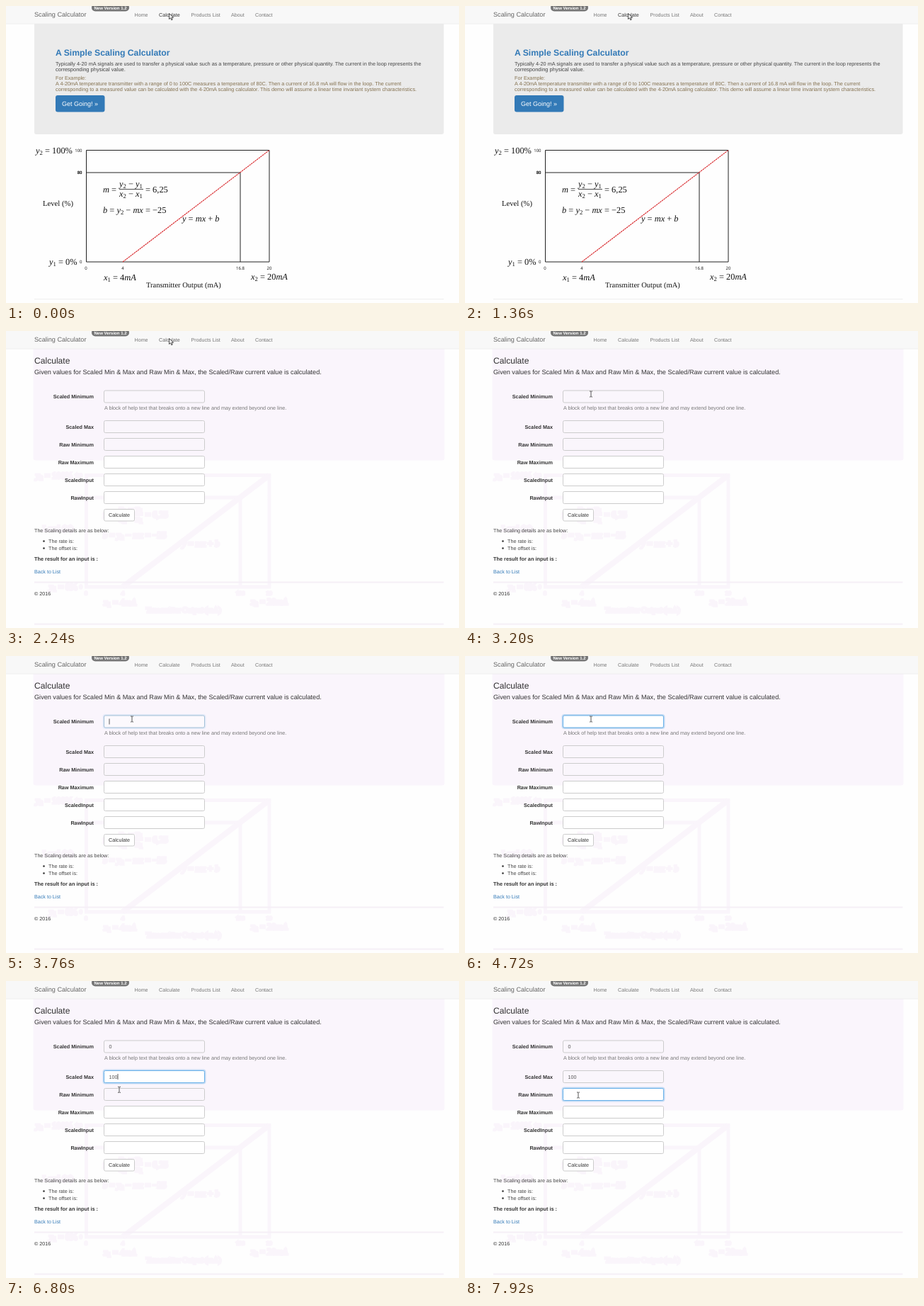
These frames come from a looping animation (640x419 px, 8 s). An HTML page:

```html
<!DOCTYPE html>
<html lang="en">
<head>
<meta charset="utf-8">
<title>Scaling Calculator</title>
<style>
html, body { margin: 0; width: 100%; height: 100%; overflow: hidden; background: #fefefe; }
svg { display: block; width: 640px; height: 419px; }
text { font-family: "Liberation Sans", Arial, sans-serif; white-space: pre; text-rendering: geometricPrecision; }
.serif { font-family: "Liberation Serif", Times, serif; fill: #111; }
.tick { font-family: "Open Sans", sans-serif; fill: #111; }
.ghost * { stroke: #faf5fb !important; fill: #faf5fb; }
.ghost text { stroke-width: 3.5; }
.ghost path { stroke-width: 5; stroke-dasharray: none; fill: none; }
.ghost .slope { stroke-width: 8; }
</style>
</head>
<body>
<svg id="stage" viewBox="0 0 640 419"></svg>
<script>
const text = (x, y, size, str, fill = '#444', extra = '') =>
  `<text x="${x}" y="${y}" font-size="${size}" fill="${fill}" ${extra}>${str}</text>`;
const box = (x, y, w, h, r, fill, extra = '') =>
  `<rect x="${x}" y="${y}" width="${w}" height="${h}" rx="${r}" fill="${fill}" ${extra}/>`;
const line = (d, stroke, extra = '') => `<path d="${d}" fill="none" stroke="${stroke}" ${extra}/>`;
const serif = (x, y, size, str) => text(x, y, size, str, '#111', 'class="serif"');
const tick = (x, y, str, extra = '') =>
  text(x, y, 6, str, '#111', `class="tick" text-anchor="${y > 370 ? 'middle' : 'end'}" ${extra}`);
const bold = 'font-weight="bold"';

// Letters are italic; "_1" becomes a subscript.
function math(x, y, str) {
  let drop = 0;
  const parts = str.match(/_\d|[a-zA-Z]+|[^a-zA-Z_]+/g).map(part => {
    const sub = part[0] === '_', dy = (sub ? 2.2 : 0) - drop;
    drop += dy;
    const style = sub ? 'font-size="8.7"' : /[a-z]/i.test(part) ? 'font-style="italic"' : '';
    return `<tspan dy="${dy}" ${style}>${part.replace('_', '')}</tspan>`;
  });
  return serif(x, y, 12.4, parts.join(''));
}

const chart =
  line('M113.5 361V203.5H372V361ZM113.5 235H331V361', '#222') +
  line('M165 361L372 203.5', '#d8282c', 'class="slope" stroke-width="1.1" stroke-dasharray="2.6 .7"') +
  tick(107.5, 206, '100') + tick(107.5, 237.3, '80', bold) + tick(107.5, 363.3, '0') +
  tick(113, 371.6, '0') + tick(165, 371.6, '4') + tick(331, 371.6, '16.8') + tick(372, 371.6, '20') +
  math(42, 207.5, 'y_2 = 100%') + math(61, 364.5, 'y_1 = 0%') +
  math(138, 386.5, 'x_1 = 4mA') + math(346, 385.5, 'x_2 = 20mA') +
  math(137, 262.5, 'm =') + math(160, 254.5, 'y_2 − y_1') + math(160, 268.8, 'x_2 − x_1') +
  line('M160 258.5H194', '#222', 'stroke-width=".8"') + math(197, 262.5, '= 6,25') +
  math(137, 291.5, 'b = y_2 − mx = −25') + math(249, 304, 'y = mx + b') +
  serif(52, 281.5, 10.7, 'Level (%)') + serif(198, 397, 10.5, 'Transmitter Output (mA)');

const brown = '#84714f', blue = '#337ab7';
const home =
  box(40, 20, 578.5, 161, 3, '#ebebeb') +
  text(70, 70.3, 12.2, 'A Simple Scaling Calculator', blue, bold) +
  text(70, 84, 7.3, 'Typically 4-20 mA signals are used to transfer a physical value such as a temperature, pressure or other physical quantity. The current in the loop represents the') +
  text(70, 91.6, 7.5, 'corresponding physical value.') +
  text(70, 104, 7.25, 'For Example:', brown) +
  text(70, 112, 7.28, 'A 4-20mA temperature transmitter with a range of 0 to 100C measures a temperature of 80C. Then a current of 16.8 mA will flow in the loop. The current', brown) +
  text(70, 119.7, 7.3, 'corresponding to a measured value can be calculated with the 4-20mA scaling calculator. This demo will assume a linear time invariant system characteristics.', brown) +
  box(70, 126, 69.5, 23.5, 3, blue) + text(79, 140.9, 9, 'Get Going! »', '#fff') +
  chart + line('M40 413.5H618.5', '#eee');

const fields = [['Scaled Minimum', 92.5], ['Scaled Max', 135], ['Raw Minimum', 160],
  ['Raw Maximum', 185], ['ScaledInput', 210], ['RawInput', 235]];
const form =
  box(38.5, 20, 581, 162.5, 3, '#faf5fc') + `<g class="ghost">${chart}</g>` +
  line('M40 413.5H618.5M40 354.5H618.5', '#f6f0f7', 'stroke-width="2"') +
  text(40, 46, 12.1, 'Calculate', '#333') +
  text(40, 61, 9.13, 'Given values for Scaled Min &amp; Max and Raw Min &amp; Max, the Scaled/Raw current value is calculated.', '#333') +
  fields.map(([label, y], i) =>
    text(124, y + 2.6, 7.25, label, '#333', bold + ' text-anchor="end"') +
    box(138.5, y - 8.5, 142, 17, 2, i < 3 ? '#faf6fc' : '#fff', 'stroke="#ccc"')).join('') +
  text(139, 111.3, 7.23, 'A block of help text that breaks onto a new line and may extend beyond one line.', '#777') +
  box(138.5, 251.5, 43, 16.5, 2, '#fff', 'stroke="#ccc"') +
  text(160, 262.3, 7.2, 'Calculate', '#333', 'text-anchor="middle"') +
  text(40, 283.6, 7.18, 'The Scaling details are as below:') +
  '<circle cx="53.5" cy="296.5" r="1.3" fill="#333"/><circle cx="53.5" cy="306.5" r="1.3" fill="#333"/>' +
  text(60, 298.8, 7.2, 'The rate is:') + text(60, 308.8, 7.2, 'The offset is:') +
  text(40, 324.3, 7.33, 'The result for an input is :', '#333', bold) +
  text(40, 342, 7.16, 'Back to List', blue) + text(40, 373, 7.15, '© 2016', '#333') +
  `<g id="focus">${box(137.5, -9.5, 144, 19, 3, 'none', 'stroke="#66afe9" stroke-opacity=".35" stroke-width="2"')}
   ${box(138.5, -8.5, 142, 17, 2, '#fff', 'stroke="#66afe9"')}</g>` +
  text(145.5, 95.1, 7.2, '', '#555', 'id="min"') + text(145.5, 137.6, 7.2, '', '#555', 'id="max"') +
  line('M0 -4V4', '#333', 'id="caret" stroke-width=".8"');

const header =
  box(0, 0, 640, 25, 0, '#f8f8f8') + line('M0 25.2H640', '#e7e7e7', 'stroke-width=".6"') +
  text(40, 15.4, 9.12, 'Scaling Calculator', '#666') +
  box(121, -3, 53, 10.5, 5, '#777') + text(124.5, 5, 6.05, 'New Version 1.2', '#fff', bold) +
  [[181.5, 'Home'], [216, 'Calculate', 'id="link"'], [261.5, 'Products List'], [318, 'About'], [352, 'Contact']]
    .map(([x, label, id]) => text(x, 15, 7.15, label, '#777', id)).join('');

const arrow = '<path id="arrow" d="M0 0V8L2 6.3L3.3 9.3L4.7 8.7L3.4 5.8H6Z" fill="#fff" stroke="#222" stroke-width=".8"/>';
const beam = line('M-2 -4H-.6L0 -3.4L.6 -4H2M0 -3.4V3.4M-2 4H-.6L0 3.4L.6 4H2', '#444', 'id="beam" stroke-width=".9"');

const stage = document.getElementById('stage');
stage.innerHTML = `<g id="home">${home}</g><g id="form">${form}</g>${header}<g id="pointer">${arrow}${beam}</g>`;
const el = {};
for (const node of stage.querySelectorAll('[id]')) el[node.id] = node;

const LOOP = 8000, SWITCH = 2240;
const path = [[0, 230.5, 10.5], [2400, 230.5, 10.5], [2960, 178, 89], [5200, 178, 89],
  [5600, 160, 135], [6590, 160, 135], [6920, 160, 161], [LOOP, 160, 161]];
const focuses = [3700, 5700, 7200];
const keys = [{ id: 'min', str: '0', times: [4960] }, { id: 'max', str: '100', times: [6080, 6240, 6400] }];
const show = (node, on) => node.setAttribute('visibility', on ? 'inherit' : 'hidden');

function pointerAt(t) {
  const i = path.findIndex(p => p[0] > t);
  const [t0, x0, y0] = path[i - 1], [t1, x1, y1] = path[i];
  const u = (t - t0) / (t1 - t0), s = u * u * (3 - 2 * u);
  return [x0 + (x1 - x0) * s, y0 + (y1 - y0) * s];
}

function draw(t) {
  const onForm = t >= SWITCH;
  show(el.home, !onForm);
  show(el.form, onForm);

  const [x, y] = pointerAt(t), text = y > 80;
  el.pointer.setAttribute('transform', `translate(${x} ${y})`);
  show(el.arrow, !text);
  show(el.beam, text);
  el.link.setAttribute('fill', !onForm ? '#333' : y < 22 ? '#666' : '#777');

  for (const { id, str, times } of keys)
    el[id].textContent = str.slice(0, times.filter(k => k <= t).length);

  const active = focuses.filter(f => f <= t).length - 1;
  show(el.focus, onForm && active >= 0);
  show(el.caret, false);
  if (active < 0) return;
  const row = fields[active][1], since = t - focuses[active];
  el.focus.setAttribute('transform', `translate(0 ${row})`);
  el.focus.setAttribute('opacity', Math.min(1, since / 150));

  const typed = keys[active] ? keys[active].times.filter(k => k <= t) : [];
  const last = Math.max(focuses[active], ...typed);
  el.caret.setAttribute('transform', `translate(${146 + typed.length * 4} ${row})`);
  show(el.caret, (t - last) % 1060 < 530);
}

function frame(now) {
  draw(now % LOOP);
  requestAnimationFrame(frame);
}
draw(0);
requestAnimationFrame(frame);
</script>
</body>
</html>
```
